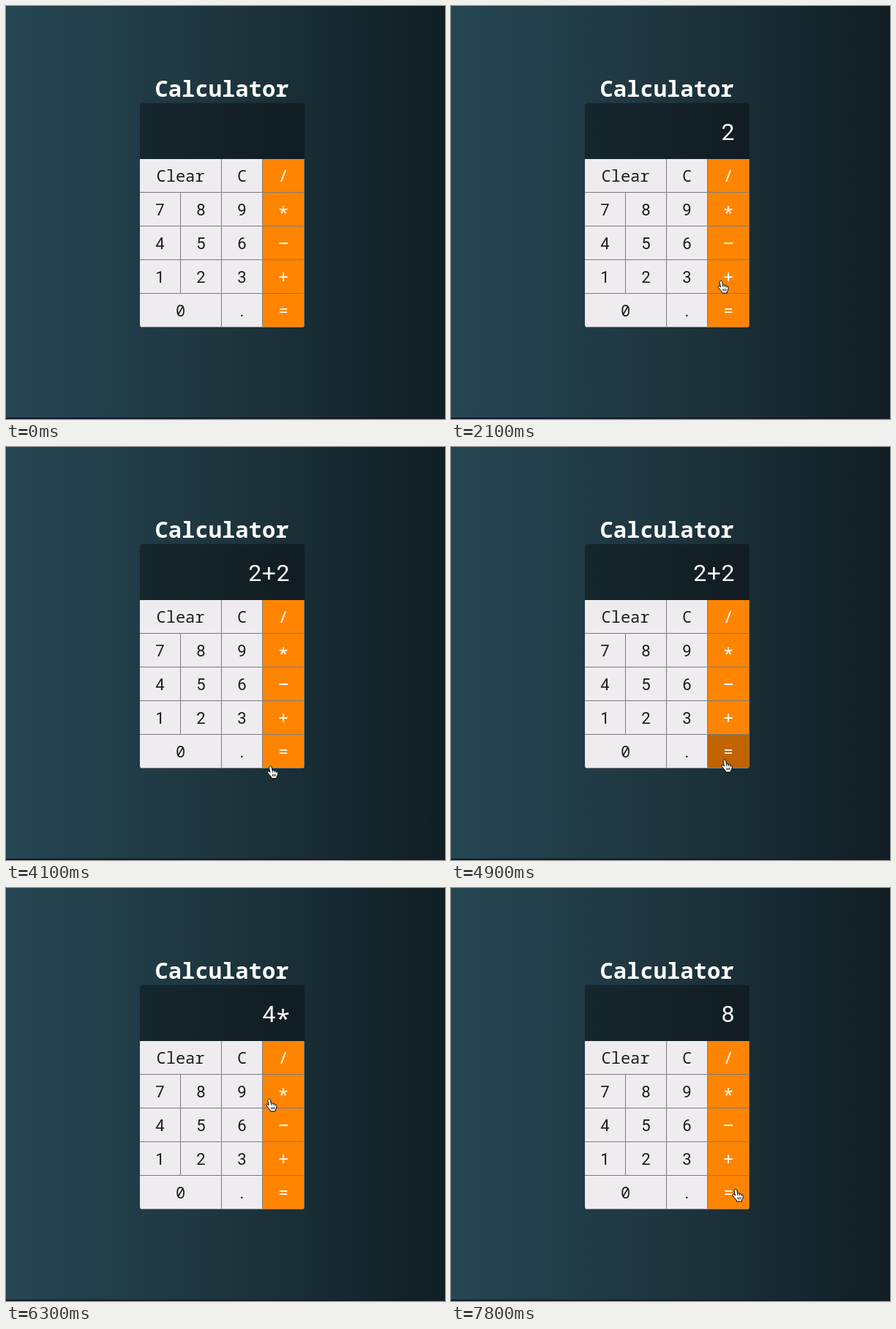
An HTML page that plays this animation: 600x564 px, repeating every 8000 ms.

```html
<!DOCTYPE html>
<html lang="en">
<head>
<meta charset="utf-8">
<title>Calculator</title>
<style>
  html, body { margin: 0; width: 100%; height: 100%; overflow: hidden; background: #1e353e; }
  svg { display: block; width: 600px; height: 564px; }
  text { font-family: "Noto Sans Mono", "DejaVu Sans Mono", monospace; text-anchor: middle; }
  text.digit { font-family: Roboto, sans-serif; }
  .title { font-size: 30.5px; font-weight: 700; fill: #fff; }
</style>
</head>
<body>
<svg viewBox="0 0 600 564">
  <defs>
    <linearGradient id="backdrop">
      <stop offset="0" stop-color="#254653"/>
      <stop offset=".5" stop-color="#1e353e"/>
      <stop offset="1" stop-color="#101e24"/>
    </linearGradient>
    <clipPath id="body"><rect x="183" y="132.5" width="225" height="306.5" rx="4"/></clipPath>
  </defs>
  <rect width="600" height="564" fill="url(#backdrop)"/>
  <rect y="562" width="600" height="2" fill="#17192c"/>
  <text class="title" x="295" y="123.5">Calculator</text>
  <g clip-path="url(#body)">
    <rect x="183" y="132" width="225" height="77" opacity=".36"/>
    <g id="keys"></g>
  </g>
  <g id="readout"></g>
  <g id="hand" stroke="#000" stroke-linejoin="round" stroke-linecap="round">
    <path fill="#fff" d="M-2 1C-2-1.4 1.2-1.5 1.7.8L2.6 5.3C3.4 4.2 5 4.5 5.3 5.8 6.3 5 7.7 5.5 7.9 6.8 9.2 6.2 10.3 7.2 10.2 8.8L9.6 12.3 8.4 14.2V16H1.4V14.6L-1.9 10.6-3.7 8.2C-4.8 6.5-2.7 5.5-1.5 6.9L-.8 7.6Z"/>
    <path fill="none" stroke-width=".9" d="M2.6 5.3L3 7.6M5.3 5.8L5.6 7.7M7.9 6.8L8 8.3M3 10.5V13M5 10.5V13M7 10.5V13"/>
  </g>
</svg>
<script>
const LOOP = 8000, STEP = 100;
const REST = 200, PRESS = 80;
const LEFT = 183, TOP = 209, KEY_W = 56.25, KEY_H = 46;
// A space widens the key before it.
const LAYOUT = ["K C/", "789*", "456-", "123+", "0 .="];

// Where the hand stops: key, time, offset from the key's centre.
const STOPS = [
  { key: "-", at: 0, dx: 42, dy: 0, hover: true },
  { key: "2", at: 1000, dx: 0, dy: 1 },
  { key: "+", at: 2310, dx: -10, dy: 6 },
  { key: "2", at: 3200, dx: 1, dy: 1 },
  { key: "=", at: 4500, dx: -4, dy: 30, hover: true },
  { key: "=", at: 4900, dx: -5, dy: 12 },
  { key: "*", at: 6000, dx: -2, dy: -3 },
  { key: "2", at: 6800, dx: 0, dy: -6 },
  { key: "=", at: 7600, dx: 10, dy: -4 }
];
const CLICKS = STOPS.filter(stop => !stop.hover);

const byId = id => document.getElementById(id);

function add(parent, tag, attrs, content = "") {
  const node = document.createElementNS("http://www.w3.org/2000/svg", tag);
  for (const name in attrs) node.setAttribute(name, attrs[name]);
  node.textContent = content;
  parent.append(node);
  return node;
}

function addLabel(parent, label, x, baseline, size, fill) {
  const isSign = "+-*".includes(label);
  const drop = isSign ? size * (label === "*" ? 0.28 : 0.05) : 0;
  add(parent, "text", {
    x, y: baseline + drop, fill,
    "font-size": isSign ? size * 1.15 : size,
    class: /^[1-9.]$/.test(label) ? "digit" : ""
  }, label.replace("-", "\u2212"));
}

const column = c => Math.floor(LEFT + c * KEY_W);
const keys = {};

function addKey(label, row, col, span) {
  const x = column(col), right = column(col + span), y = TOP + row * KEY_H;
  const isOperator = col === 3;
  const color = isOperator ? "#ff8500" : "#eeecee";
  const pressed = isOperator ? "#c06400" : "#b8b6b8";
  const face = add(byId("keys"), "rect", { x, y, width: right - x, height: KEY_H, fill: color });
  add(byId("keys"), "path", { d: `M${right - 0.5} ${y}V${y + KEY_H - 0.5}H${x}`, fill: "none", stroke: "#7c7b7c" });
  const centre = (x + right - 1) / 2;
  addLabel(byId("keys"), label === "K" ? "Clear" : label, centre, y + 31, 22, isOperator ? "#fff" : "#1c1d1f");
  keys[label] = { face, color, pressed, x: centre, y: y + KEY_H / 2 };
}

LAYOUT.forEach((line, row) => [...line].forEach((label, col) => {
  if (label !== " ") addKey(label, row, col, line[col + 1] === " " ? 2 : 1);
}));

function calculate([a, sign, b]) {
  return String(sign === "+" ? +a + +b : a * b);
}

function expressionAt(time) {
  return CLICKS.filter(click => time >= click.at + PRESS)
    .reduce((text, { key }) => key === "=" ? calculate(text) : text + key, "");
}

function showReadout(text) {
  byId("readout").replaceChildren();
  [...text].reverse().forEach((char, i) =>
    addLabel(byId("readout"), char, 378.6 - i * 19.2, 183, 32, "#fff"));
}

function fingertip(time) {
  const next = STOPS.findIndex(stop => stop.at > time);
  const to = STOPS.at(next), from = next < 0 ? to : STOPS[next - 1];
  const travel = to.at - from.at - 2 * REST;
  const u = travel > 0 ? Math.min(1, Math.max(0, (time - from.at - REST) / travel)) : +(time > from.at + REST);
  const ease = u * u * (3 - 2 * u);
  const place = (axis, offset) => {
    const start = keys[from.key][axis] + from[offset], end = keys[to.key][axis] + to[offset];
    return start + (end - start) * ease;
  };
  return [place("x", "dx"), place("y", "dy")];
}

let shown = "";
function render(time) {
  const text = expressionAt(time);
  if (text !== shown) showReadout(shown = text);
  const click = CLICKS.find(({ at }) => time >= at && time < at + PRESS);
  for (const label in keys) {
    const key = keys[label];
    key.face.setAttribute("fill", click && click.key === label ? key.pressed : key.color);
  }
  byId("hand").setAttribute("visibility", time < REST ? "hidden" : "visible");
  byId("hand").setAttribute("transform", `translate(${fingertip(time)})`);
}

const start = performance.now();
function tick() {
  const elapsed = (performance.now() - start) % LOOP;
  render(Math.floor(elapsed / STEP) * STEP);
  requestAnimationFrame(tick);
}
tick();
</script>
</body>
</html>
```
